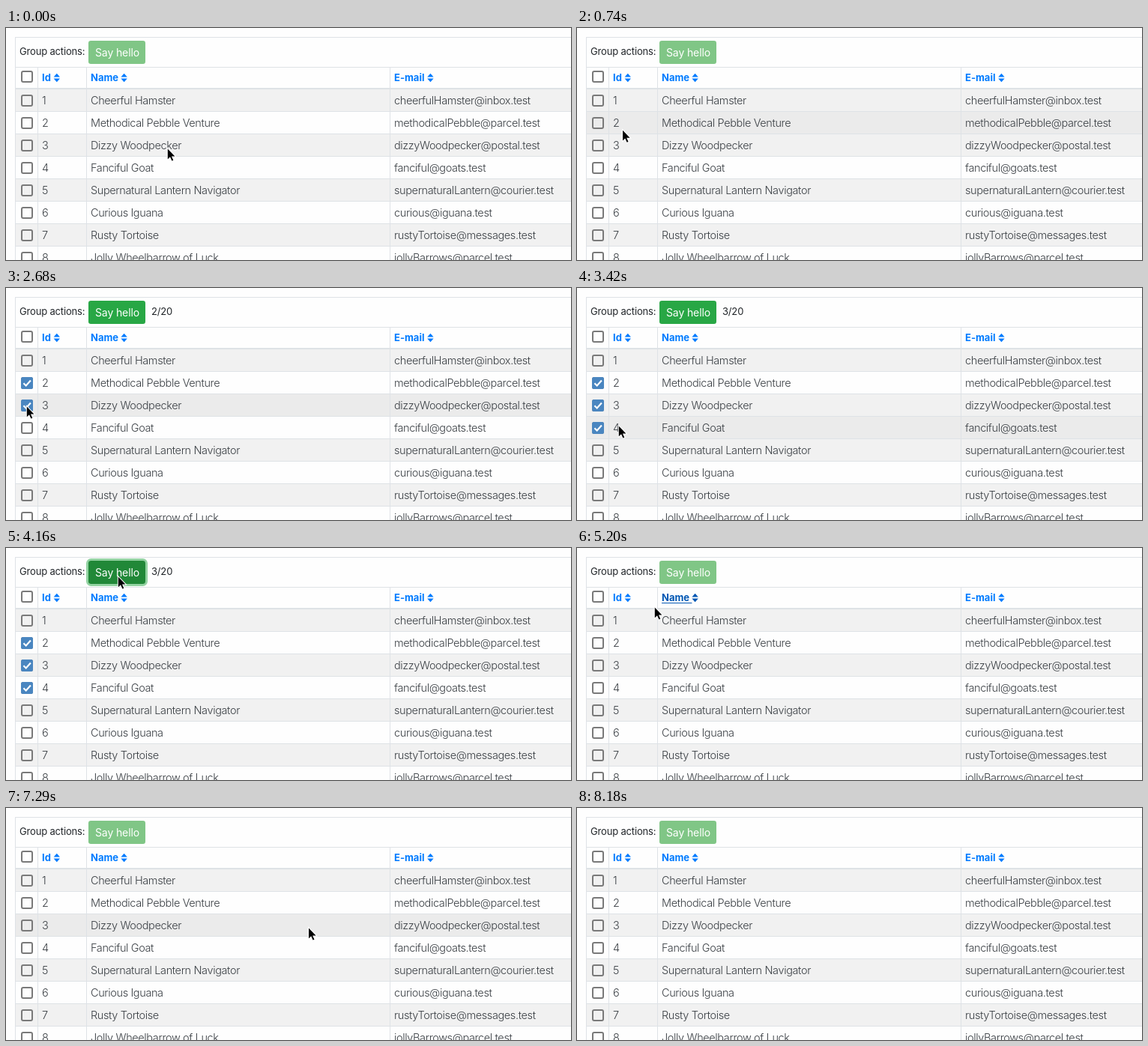
Recreate the animation shown at these times as an HTML page. Size 754 by 310 pixels, loop 8.46 s.

```html
<!DOCTYPE html>
<html lang="en">
<head>
<meta charset="utf-8">
<title>Group actions table</title>
<style>
html, body { margin: 0; width: 100%; height: 100%; overflow: hidden; background: #fefefe; }
svg { display: block; }
text { font: 300 14.5px Inter, "Open Sans", sans-serif; letter-spacing: -.38px; fill: #3a3f44; white-space: pre; }
.bar { font-size: 13px; font-weight: 400; letter-spacing: -.17px; fill: #212529; }
.label { font-size: 14px; font-weight: 400; letter-spacing: -.12px; fill: #fff; }
.head { fill: #007bff; }
.head text { font-size: 13px; font-weight: 700; letter-spacing: 0; fill: inherit; }
.head.on { fill: #0056b3; }
.head rect { visibility: hidden; }
.head.on rect { visibility: visible; }
.line { fill: #dee2e6; }
.empty { fill: none; stroke: #797979; stroke-width: 2; }
.tick { fill: none; stroke: #fff; stroke-width: 2.2; }
#arrow { stroke: #fff; stroke-width: 2; paint-order: stroke; }
</style>
</head>
<body>
<svg id="stage" width="754" height="310" viewBox="0 0 754 310"></svg>
<script>
const LOOP = 8460, STEP = 148.4, START = 288, GONE = 53;
const people = [
  ["Cheerful Hamster", "cheerfulHamster@inbox.test"],
  ["Methodical Pebble Venture", "methodicalPebble@parcel.test"],
  ["Dizzy Woodpecker", "dizzyWoodpecker@postal.test"],
  ["Fanciful Goat", "fanciful@goats.test"],
  ["Supernatural Lantern Navigator", "supernaturalLantern@courier.test"],
  ["Curious Iguana", "curious@iguana.test"],
  ["Rusty Tortoise", "rustyTortoise@messages.test"],
  ["Jolly Wheelbarrow of Luck", "jollyBarrows@parcel.test"]
];

// Pointer moves: from step, to step, goal x, goal y
const moves = [
  [-1, 7, 27, 130], [10, 13, 27, 157], [16, 18, 27, 181], [20, 21, 55, 183], [21, 26, 149, 37],
  [31, 33, 103, 78], [33, 37, 27, 130], [43, 49, 429, 161], [50, 52, 633, 257]
];

// Selected spans: row, from step, to step
const picks = [[1, 9, 27], [2, 14, 27], [3, 19, 27], [1, 38, 43]];

const rect = (x, y, w, h, more = "") => `<rect x="${x}" y="${y}" width="${w}" height="${h}" ${more}/>`;
const text = (x, y, s, more = "") => `<text x="${x}" y="${y}" ${more}>${s}</text>`;
const line = (x, y, w, h) => rect(x, y, w, h, 'class="line"');
const box = y => rect(21, y + 1, 14, 14, 'rx="2" class="empty"');

function heading(x, label, icon) {
  return `<g class="head" id="by${label}">${text(x, 71, label)}${rect(x, 73, icon - x, 1)}
    <path d="M${icon} 65.5l4.2-4.7 4.2 4.7zM${icon} 67.5h8.4l-4.2 4.7z"/></g>`;
}

function row([name, mail], i) {
  const y = 82 + 30 * i;
  return rect(13, y, 741, 29, `id="row${i}"`) + line(12, y + 29, 742, 1) + box(y + 7) +
    `<g id="mark${i}" fill="#4a86c0">${rect(20, y + 7, 16, 16, 'rx="2.5"')}
    <path class="tick" d="M23.4 ${y + 15.2}l3.3 3.3 6.2-6.9"/></g>` +
    text(48, y + 20, i + 1) + text(113, y + 20, name) + text(518, y + 20, mail);
}

const $ = id => document.getElementById(id);
$("stage").innerHTML =
  people.map(row).join("") +
  line(12, 12, 742, 1) + line(12, 52, 742, 1) + line(12, 80, 742, 2) +
  line(12, 12, 1, 298) + [42, 107, 512].map(x => line(x, 52, 1, 258)).join("") +
  text(18, 36, "Group actions:", 'class="bar"') +
  rect(108.5, 15.5, 79, 34, 'rx="5" id="ring" fill="none" stroke="#93d3a2" stroke-width="3"') +
  rect(110, 17, 76, 31, 'rx="3.2" id="button"') +
  text(119, 38, "Say hello", 'class="label"') +
  text(194, 36, "", 'class="bar" id="count"') +
  box(57) +
  heading(48, "Id", 63.6) + heading(113, "Name", 153.4) + heading(518, "E-mail", 562.2) +
  '<path id="arrow" d="M.8 1.4V15.2L4 12.2 6.4 17.5 8.3 16.7 6 11.4H10.4Z"/>';

function pointer(n) {
  let x = 215, y = 160;
  for (const [from, to, gx, gy] of moves) {
    const k = Math.min(1, Math.max(0, (n - from) / (to - from)));
    const ease = 1 - (1 - k) ** 2.5;
    x += (gx - x) * ease;
    y += (gy - y) * ease;
  }
  return [x, y];
}

const show = (id, on) => $(id).setAttribute("visibility", on ? "visible" : "hidden");
const fill = (id, color) => $(id).setAttribute("fill", color);

function draw(t) {
  const n = Math.max(-1, Math.floor((t - START) / STEP));
  const [x, y] = pointer(n);
  const hover = n >= 0 && n < 49 ? Math.floor((y - 82) / 30) : -1;
  const active = picks.filter(([, from, to]) => n >= from && n < to);

  people.forEach((_, i) => {
    fill("row" + i, i === hover ? "#ebebeb" : i % 2 ? "#fefefe" : "#f1f1f1");
    show("mark" + i, active.some(p => p[0] === i));
  });

  fill("button", !active.length ? "#80c686" : x > 110 && y < 48 ? "#218838" : "#28a745");
  show("ring", n === 26);
  $("count").textContent = active.length ? active.length + "/20" : "";
  $("byName").classList.toggle("on", n === 32 || n === 33);
  $("arrow").setAttribute("transform", `translate(${x} ${y})`);
  show("arrow", n < GONE);
}

const begin = performance.now();
function tick() {
  draw((performance.now() - begin) % LOOP);
  requestAnimationFrame(tick);
}
tick();
</script>
</body>
</html>
```
